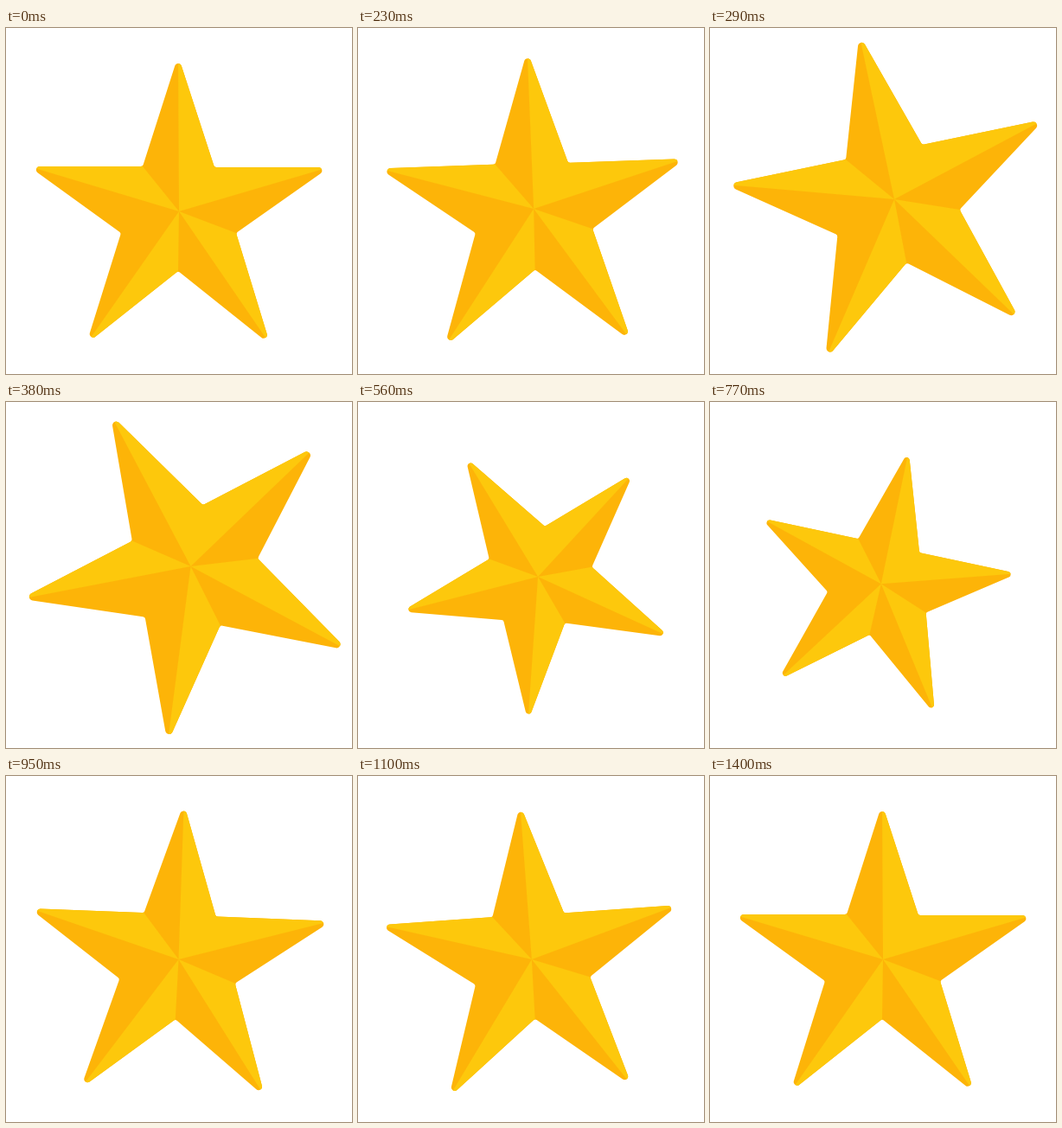
Animation, 400 px wide and 400 px high, one loop 1.43 s. Source, as an HTML page with a canvas:

```html
<!DOCTYPE html>
<html lang="en">
<head>
<meta charset="utf-8">
<title>Star</title>
<style>
  html, body { margin: 0; height: 100%; overflow: hidden; background: #fff; }
  canvas { display: block; }
</style>
</head>
<body>
<canvas id="stage" width="400" height="400"></canvas>
<script>
const ctx = document.getElementById('stage').getContext('2d');
const LOOP = 1430, HOLD = 200, STEP = 30, CENTER = 200;
const LIGHT = '#fdc80c', DARK = '#fdb408';

// Outline clockwise from the top, tips and notches alternating
const hub = [200, 212];
const outline = [
  [199, 32], [241, 161], [374, 161], [266, 237], [305.5, 366],
  [199, 281], [93, 365], [133, 237], [26.5, 160], [158, 160]
];
const shades = 'LLDLDLDDLD';

// Keys are [step, value]
const tracks = {
  angle: [[0, 0], [3, -11.7], [6, -27.5], [9, -38.5], [12, -31], [19, 12], [21, 15], [28, -6], [30, -4], [40, 0]],
  scale: [[0, 1], [3, 1.083], [5, 1.107], [6, 1.104], [12, 0.897], [15.5, 0.83], [19, 0.873], [25, 1.004], [30, 0.998], [40, 1]],
  x: [[0, 0], [3, 10.4], [6, 7.4], [12, 2.5], [16, 0], [40, 0]],
  y: [[0, 0], [3, -14.7], [6, -21.7], [12, -7.2], [16, 0], [40, 0]]
};

const slope = (a, b) => (b[1] - a[1]) / (b[0] - a[0]);

// Tangent at a key: flat at ends and turning points
function tangent(keys, i) {
  if (i === 0 || i === keys.length - 1) return 0;
  const a = slope(keys[i - 1], keys[i]), b = slope(keys[i], keys[i + 1]);
  return a * b > 0 ? 2 * a * b / (a + b) : 0;
}

function sample(keys, k) {
  let i = 0;
  while (i < keys.length - 2 && k > keys[i + 1][0]) i++;
  const [k0, v0] = keys[i], [k1, v1] = keys[i + 1];
  const span = k1 - k0, u = (k - k0) / span, w = 1 - u;
  return v0 * w * w * (1 + 2 * u) + v1 * u * u * (3 - 2 * u)
    + span * u * w * (w * tangent(keys, i) - u * tangent(keys, i + 1));
}

function clipToStar() {
  const n = outline.length, last = outline[n - 1], first = outline[0];
  ctx.beginPath();
  ctx.moveTo((last[0] + first[0]) / 2, (last[1] + first[1]) / 2);
  outline.forEach((p, i) => ctx.arcTo(...p, ...outline[(i + 1) % n], i % 2 ? 3 : 4));
  ctx.closePath();
  ctx.clip();
}

function drawStar() {
  clipToStar();
  ctx.fillStyle = DARK;
  ctx.fillRect(0, 0, 400, 400);
  const beyond = p => p.map((v, i) => hub[i] + (v - hub[i]) * 1.5);
  ctx.beginPath();
  outline.forEach((p, i) => {
    if (shades[i] === 'D') return;
    ctx.moveTo(...hub);
    ctx.lineTo(...beyond(p));
    ctx.lineTo(...beyond(outline[(i + 1) % outline.length]));
    ctx.closePath();
  });
  ctx.fillStyle = LIGHT;
  ctx.fill();
}

function render(now) {
  const k = Math.max(0, Math.floor((now % LOOP - HOLD) / STEP));
  const at = name => sample(tracks[name], k);
  ctx.clearRect(0, 0, 400, 400);
  ctx.save();
  ctx.translate(CENTER + at('x'), CENTER + at('y'));
  ctx.rotate(at('angle') * Math.PI / 180);
  ctx.scale(at('scale'), at('scale'));
  ctx.translate(-CENTER, -CENTER);
  drawStar();
  ctx.restore();
}

const start = performance.now();
function tick() {
  render(performance.now() - start);
  requestAnimationFrame(tick);
}
tick();
</script>
</body>
</html>
```
